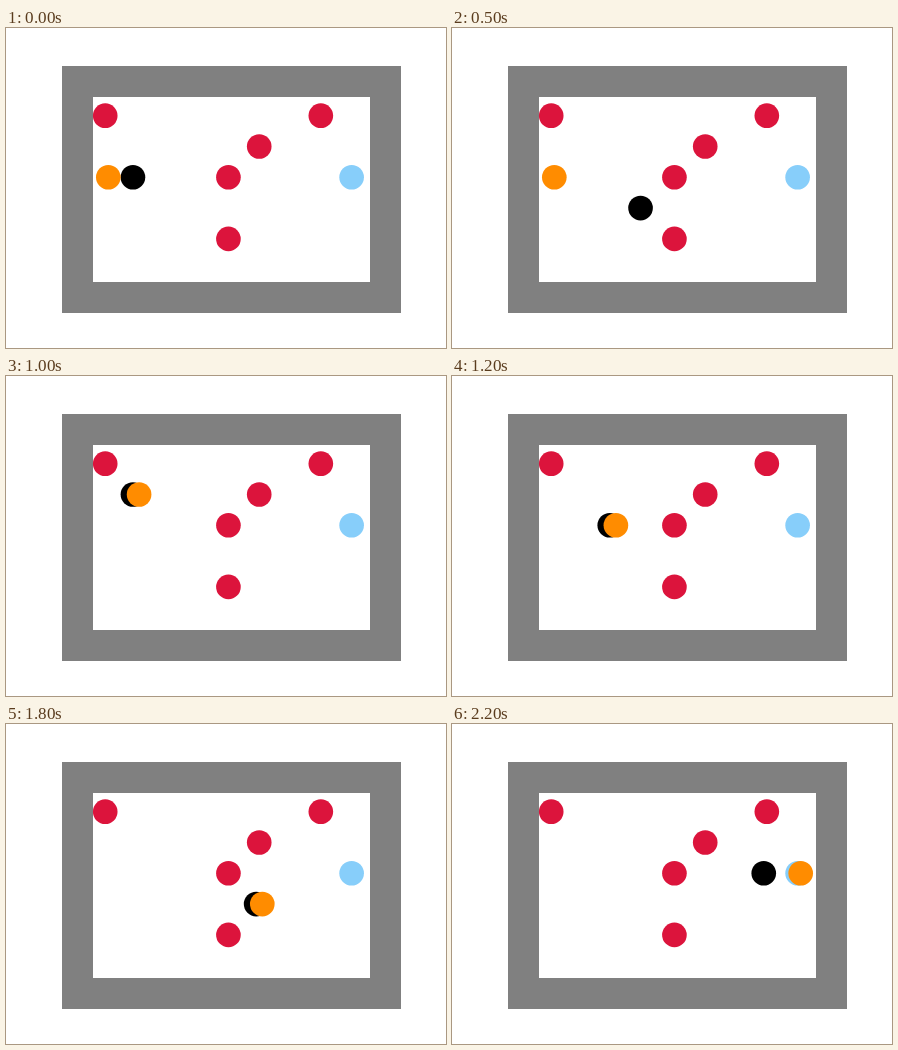
An HTML page with a canvas that plays this animation: 440x320 px, repeating every 2.3 s.

```html
<!DOCTYPE html>
<html lang="en">
<head>
<meta charset="utf-8">
<title>Grid chase</title>
<style>
  html, body { margin: 0; width: 100%; height: 100%; overflow: hidden; background: #fff; }
  canvas { display: block; }
</style>
</head>
<body>
<canvas id="stage" width="440" height="320"></canvas>
<script>
const ctx = document.getElementById('stage').getContext('2d');
const CELL = 30.8, LEFT = 56.1, TOP = 38.4, STEP = 100;

// Each two-digit entry is a grid cell: column, row.
const cells = text => text.split(' ').map(([col, row]) => [+col, +row]);
const hazards = cells('11 81 62 53 55');
const goal = [9, 3];
const travel = '12 22 23 33 33 34 44 44 54 64 74 73 83';
const tracker = cells(`23 33 24 34 33 44 44 34 23 ${travel} 83`);
const walker = cells(`${'13 '.repeat(9)}${travel} 93`);

function ball([col, row], color, shift = 0) {
  ctx.fillStyle = color;
  ctx.beginPath();
  ctx.arc(LEFT + (col + 0.5 - shift) * CELL, TOP + (row + 0.6) * CELL, 0.4 * CELL, 0, 2 * Math.PI);
  ctx.fill();
}

function box(color, x, y, w, h) {
  ctx.fillStyle = color;
  ctx.fillRect(x, y, w, h);
}

function draw() {
  const step = Math.floor(performance.now() / STEP) % walker.length;
  box('#fff', 0, 0, 440, 320);
  box('#808080', 56, 38, 339, 247);
  box('#fff', 87, 69, 277, 185);
  hazards.forEach(cell => ball(cell, '#dc143c', 0.1));
  ball(goal, '#87cefa', 0.1);
  ball(tracker[step], '#000', 0.2);
  ball(walker[step], '#ff8c00');
  requestAnimationFrame(draw);
}
draw();
</script>
</body>
</html>
```
